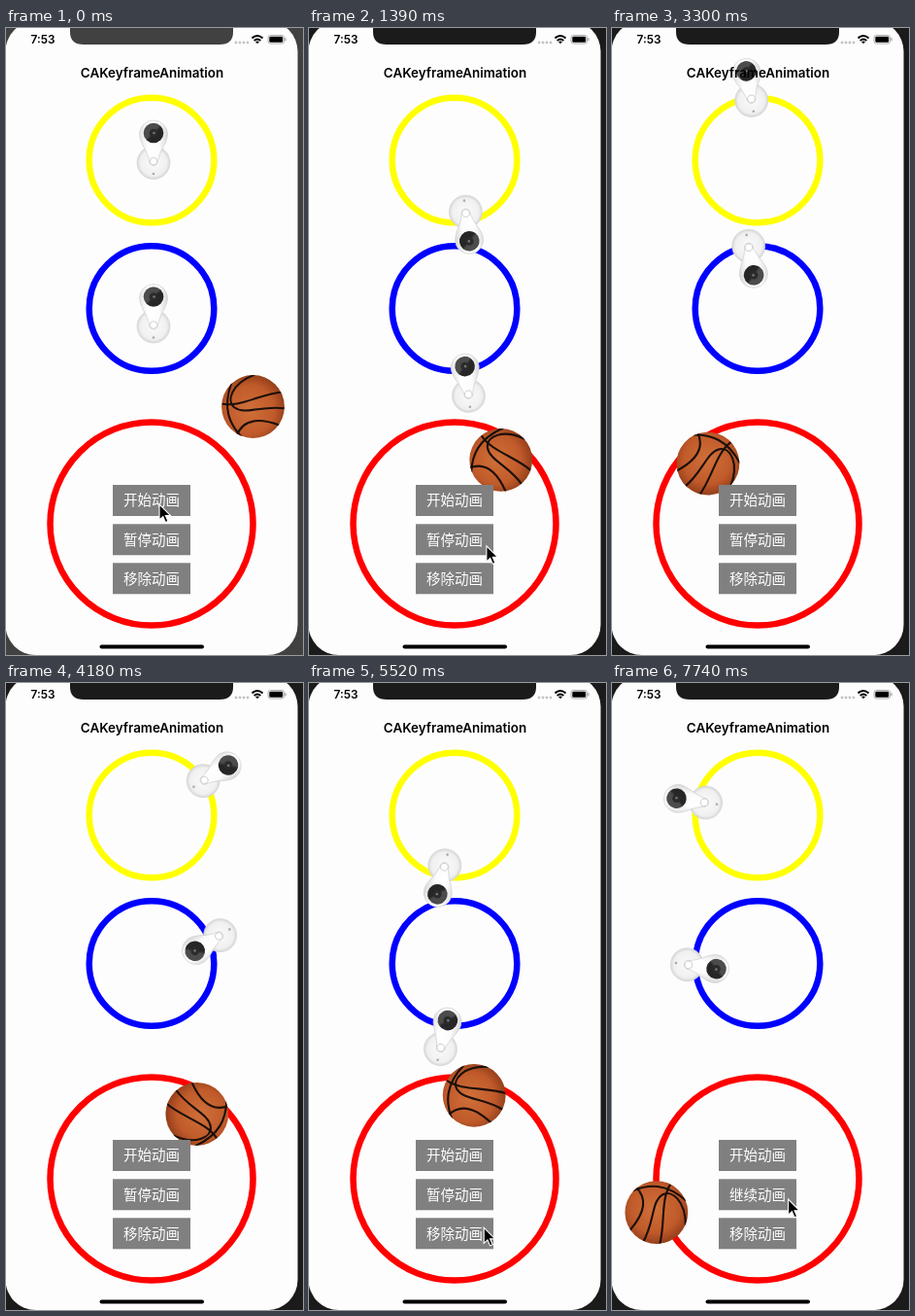
Recreate the animation shown at these times as an HTML page. Size 306x645 px, loop 8 s.

```html
<!DOCTYPE html>
<html lang="zh">
<head>
<meta charset="utf-8">
<title>CAKeyframeAnimation</title>
<style>
  html, body { margin: 0; width: 100%; height: 100%; overflow: hidden; background: #1b1b1b; }
  svg { display: block; width: 306px; height: 645px; }
  text { text-anchor: middle; }
  .latin { font-family: Inter, Roboto, sans-serif; font-weight: 600; fill: #000; }
  .button rect { fill: #808080; }
  .button text { font: 300 14.5px "Noto Sans CJK SC", "Noto Sans CJK", sans-serif; fill: #fff; }
  .ring { fill: none; stroke-width: 6.5; }
</style>
</head>
<body>
<svg viewBox="0 0 306 645">
  <defs>
    <radialGradient id="leather" cx=".45" cy=".55" r=".6">
      <stop offset="0" stop-color="#d0703a"/>
      <stop offset=".65" stop-color="#c05a2a"/>
      <stop offset="1" stop-color="#8c3a18"/>
    </radialGradient>
    <radialGradient id="base">
      <stop offset="0" stop-color="#fafafa"/>
      <stop offset=".8" stop-color="#f0f0f0"/>
      <stop offset="1" stop-color="#d6d6d6"/>
    </radialGradient>
    <linearGradient id="shell">
      <stop offset="0" stop-color="#e2e2e2"/>
      <stop offset=".3" stop-color="#fff"/>
      <stop offset=".7" stop-color="#fcfcfc"/>
      <stop offset="1" stop-color="#d8d8d8"/>
    </linearGradient>
    <linearGradient id="glass" x2="1" y2="1">
      <stop offset=".45" stop-color="#4c4c4c"/>
      <stop offset=".55" stop-color="#262626"/>
    </linearGradient>
    <clipPath id="ballEdge"><circle r="32.4"/></clipPath>
    <g id="camera">
      <circle cy="13.5" r="17" fill="url(#base)" stroke="#d4d4d4" stroke-width=".6"/>
      <path d="M-14.5-15.5A14.5 14.5 0 0 1 14.5-15.5C14-6 6 1 4.5 12A4.5 4.5 0 0 1-4.5 12C-6 1-14-6-14.5-15.5Z"
        fill="url(#shell)" stroke="#d0d0d0" stroke-width=".7"/>
      <circle cy="12" r="3.8" fill="#fff" stroke="#c4c4c4" stroke-width=".8"/>
      <circle cy="25" r="1.3" fill="#aaa"/>
      <circle cy="-17" r="10.3" fill="url(#glass)"/>
      <circle cy="-17" r="4.3" fill="#2b2b2b"/>
      <circle cx=".5" cy="-17" r="1.3" fill="#777"/>
    </g>
  </defs>

  <rect id="desk" width="306" height="645"/>
  <rect x="-.5" y="-7" width="301" height="652" rx="31" fill="#fdfdfd"/>
  <path id="notch" d="M66-1V4Q66 17 80 17H220Q234 17 234 4V-1Z"/>

  <text class="latin" x="38" y="16" font-size="11.8">7:53</text>
  <g fill="#c4c4c4">
    <circle cx="237" cy="15" r="1.4"/><circle cx="241" cy="15" r="1.4"/>
    <circle cx="245" cy="15" r="1.4"/><circle cx="249" cy="15" r="1.4"/>
  </g>
  <g fill="none" stroke="#000" stroke-width="2">
    <path d="M253.5 10.5Q259 5.5 264.5 10.5M255.7 13Q259 10 262.3 13"/>
    <path d="M259 16.3L257 14Q259 12.8 261 14Z" fill="#000" stroke="none"/>
    <rect x="270" y="7.5" width="16.5" height="8.5" rx="2.4" stroke="#999" stroke-width=".8"/>
    <rect x="271.3" y="8.8" width="13.9" height="5.9" rx="1.3" fill="#000" stroke="none"/>
    <path d="M288 10.3V13.2" stroke="#999" stroke-width="1.1"/>
  </g>

  <circle class="ring" cx="150" cy="136" r="64.3" stroke="#ff0"/>
  <circle class="ring" cx="150" cy="288.5" r="64.3" stroke="#00f"/>
  <circle class="ring" cx="150" cy="510" r="104.5" stroke="#f00"/>

  <use id="outer" href="#camera"/>
  <use id="inner" href="#camera"/>

  <g id="ball">
    <circle r="32.4" fill="url(#leather)"/>
    <g clip-path="url(#ballEdge)" fill="none" stroke="#1c100a" stroke-width="2.1">
      <path d="M-32-3C-14 1 8-13 30-15"/>
      <path d="M2-33C-22-24-28-6-19 1C-8 9 10-2 34 2"/>
      <path d="M-22-25C-32 2-24 18-12 31"/>
      <path d="M-17 30C-10 12 8 12 27 19"/>
    </g>
  </g>

  <g class="button"><rect x="110" y="470" width="80" height="32"/><text x="150" y="491.3">开始动画</text></g>
  <g class="button"><rect x="110" y="510.3" width="80" height="32"/><text id="toggle" x="150" y="531.6">暂停动画</text></g>
  <g class="button"><rect x="110" y="550.3" width="80" height="32"/><text x="150" y="571.6">移除动画</text></g>

  <text class="latin" x="150.5" y="51" font-size="13.4">CAKeyframeAnimation</text>
  <rect x="96.5" y="634.5" width="107.5" height="4" rx="2"/>
  <path id="cursor" d="M0 0V16L3.8 12.6L6.4 18.6L9 17.5L6.4 11.6H11.6Z" stroke="#fff" stroke-width="1.1"/>
</svg>
<script>
const LOOP = 8000, START = 500, BEGIN = 490, LEG = 1950, PAUSE = 6430, STEP = 147.6;
const el = id => document.getElementById(id);

// time, x, y of the pointer tip
const pointer = [
  [500, 158, 490], [1390, 183, 533], [1680, 198, 562], [2100, 262, 647],
  [5200, 225, 647], [5300, 205, 600], [5520, 180, 560], [6100, 180, 560],
  [6400, 178, 528], [7150, 217, 542], [7300, 217, 542], [7740, 181, 531]
];

function pointerAt(t) {
  const i = pointer.findIndex(key => key[0] >= t);
  if (i === 0) return pointer[0].slice(1);
  if (i < 0) return pointer[pointer.length - 1].slice(1);
  const [t0, x0, y0] = pointer[i - 1], [t1, x1, y1] = pointer[i];
  const k = (t - t0) / (t1 - t0);
  return [x0 + (x1 - x0) * k, y0 + (y1 - y0) * k];
}

// cubic-bezier(.42, 0, 1, 1)
function easeIn(x) {
  let low = 0, high = 1;
  for (let i = 0; i < 20; i++) {
    const u = (low + high) / 2;
    const value = 1.26 * u * (1 - u) ** 2 + 3 * u * u * (1 - u) + u ** 3;
    if (value < x) low = u; else high = u;
  }
  return low * low * (3 - 2 * low);
}

function place(id, x, y, angle = 0) {
  el(id).setAttribute('transform', `translate(${x} ${y}) rotate(${angle})`);
}

function orbit(id, cx, cy, radius, phi, turn) {
  const a = phi * Math.PI / 180;
  place(id, cx + radius * Math.cos(a), cy + radius * Math.sin(a), phi + turn);
}

function swingBall(time) {
  const leg = Math.floor(time / LEG), dir = leg % 2 ? 1 : -1;
  const d = dir * (210 * easeIn(time / LEG - leg) - 105);
  const slope = 0.021 * d + 3.6e-7 * d ** 3;
  const tangent = Math.atan2(slope * dir, dir) * 180 / Math.PI;
  place('ball', 150 + d, 420 + 0.0105 * d * d + 9e-8 * d ** 4, tangent + 180);
}

function render(now) {
  const t = now % LOOP, running = t >= START;
  const time = running ? START + STEP * Math.floor((t - START + 4) / STEP) : 0;
  const shade = running ? '#1b1b1b' : '#414141';
  el('desk').setAttribute('fill', shade);
  el('notch').setAttribute('fill', shade);

  if (running) {
    const elapsed = Math.min(time, PAUSE) - BEGIN;
    const phi = elapsed * 180 / LEG;
    orbit('outer', 154, 131.5, 71.5, phi, 90);
    orbit('inner', 154.5, 301, 64.5, phi, -90);
    swingBall(elapsed);
  } else {
    place('outer', 152, 125);
    place('inner', 152, 293.5);
    place('ball', 254.5, 389.5);
  }
  el('toggle').textContent = time >= 6400 ? '继续动画' : '暂停动画';
  place('cursor', ...pointerAt(time));
}

const origin = performance.now();
function frame() {
  render(performance.now() - origin);
  requestAnimationFrame(frame);
}
frame();
</script>
</body>
</html>
```
